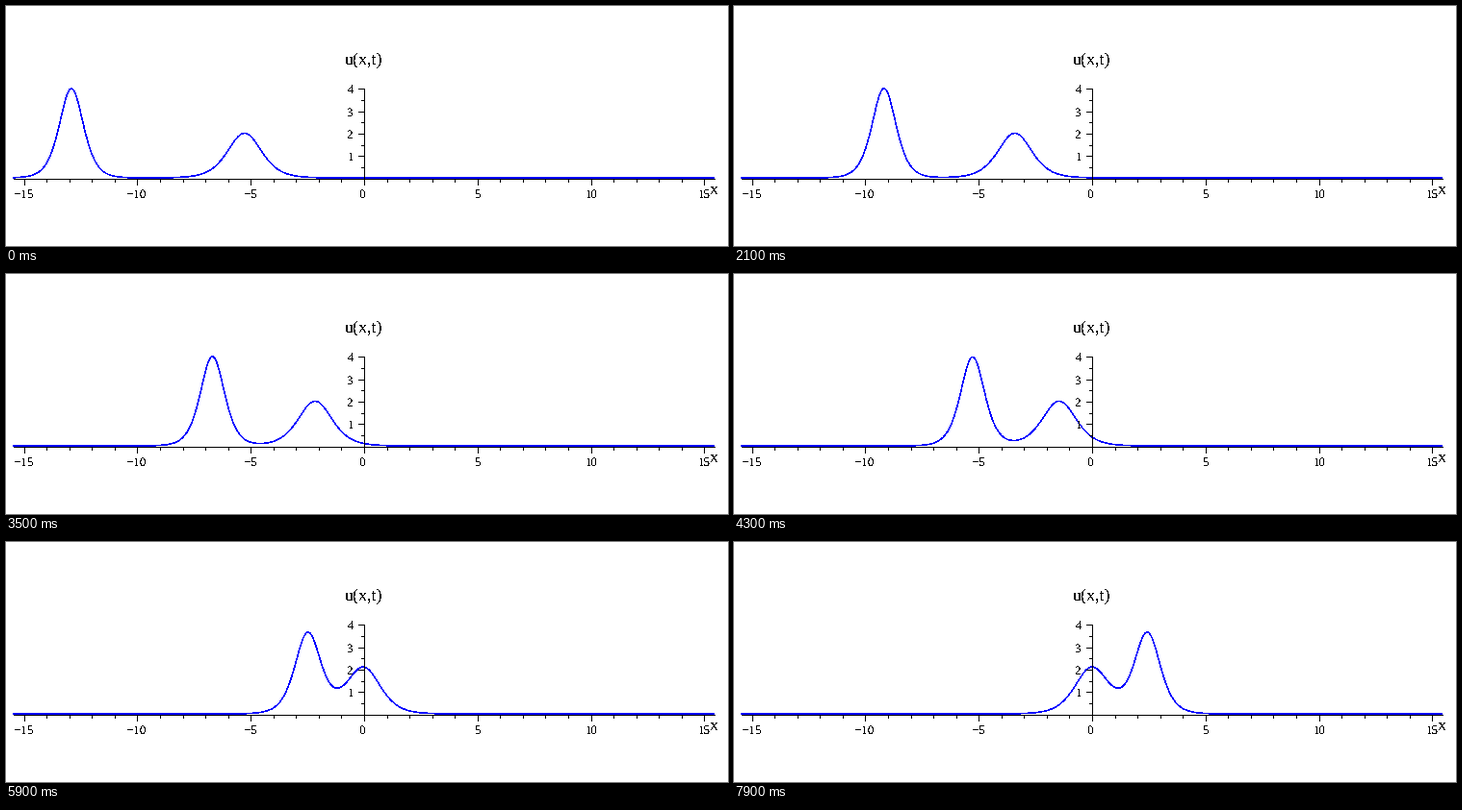
Recreate the animation shown at these times as a matplotlib script. Size 750 by 250 pixels, loop 8000 ms.

```python
"""Two-soliton solution of the KdV equation, u_t + 6 u u_x + u_xxx = 0."""
import numpy as np
import matplotlib.pyplot as plt
from matplotlib.animation import FuncAnimation

W, H, DPI = 750, 250, 100
FRAMES, INTERVAL = 80, 100
X0, Y0 = 372, 180            # pixel of the axes' crossing
SX, SY = 23.551, 23.5        # pixels per unit
LEFT, RIGHT = 8, 736
BASE, RISE = 179, 23.25      # curve's zero line and pixels per unit
HALF = 0.85                  # half of the curve's pen width
DT = 4 / 180
T0 = -69 * DT
K1, K2 = np.sqrt(8), 2.0

plt.rcParams.update({
    "font.family": "Liberation Serif",
    "text.antialiased": False,
    "text.hinting": "none",
    "text.hinting_factor": 1,
})


def px(n):
    return n * 72 / DPI


def soliton(x, t):
    """u = 2 (ln F)'' for F = b cosh A + a cosh B."""
    th1, th2 = K1 * (x - K1**2 * t), K2 * (x - K2**2 * t)
    a, b = (K1 + K2) / 2, (K1 - K2) / 2
    A, B = (th1 + th2) / 2, (th1 - th2) / 2
    F = b * np.cosh(A) + a * np.cosh(B)
    F1 = a * b * (np.sinh(A) + np.sinh(B))
    F2 = a * b * (a * np.cosh(A) + b * np.cosh(B))
    return 2 * (F2 / F - (F1 / F) ** 2)


fig = plt.figure(figsize=(W / DPI, H / DPI), dpi=DPI, facecolor="white")
ax = fig.add_axes([0, 0, 1, 1])


def rule(x1, y1, x2, y2):
    """One-pixel black bar covering both end pixels."""
    ax.add_patch(plt.Rectangle((x1, y1), x2 - x1 + 1, y2 - y1 + 1, fc="black",
                               lw=0, aa=False, snap=False, zorder=3))


def label(x, y, s, size=13, ha="center"):
    ax.text(x, y, s, size=px(size), ha=ha, va="baseline", zorder=3)


rule(LEFT, Y0, RIGHT, Y0)
rule(X0, Y0 - 94, X0, Y0)

for n in range(-15, 16):
    x = round(X0 + n * SX)
    major = n % 5 == 0
    rule(x, Y0, x, Y0 + (6 if major else 3))
    if major:
        label(x if n else x - 1, 200, str(n).replace("-", "\u2212"))

for n in range(1, 9):
    y = round(Y0 - n * SY / 2)
    major = n % 2 == 0
    rule(X0 - (6 if major else 3), y, X0, y)
    if major:
        label(361, y + 5, str(n // 2), ha="right")

label(371.5, 61, "u(x,t)", 18)
label(735, 196, "x", 18)

# The curve is plotted as hard-edged pixels lying within the pen's reach.
cols = np.arange(LEFT - 1, RIGHT) + 0.5
rows = np.arange(H)[:, None] + 0.5
canvas = np.zeros((H, W, 4))
canvas[..., 2] = 1
image = ax.imshow(canvas, extent=(0, W, H, 0), aspect="auto",
                  interpolation="nearest", zorder=2)
ax.set(xlim=(0, W), ylim=(H, 0))
ax.axis("off")


def update(i):
    y = BASE - RISE * soliton((cols + 0.5 - X0) / SX, T0 + i * DT)
    reach = HALF * np.hypot(1, np.gradient(y))
    canvas[:, LEFT - 1:RIGHT, 3] = np.abs(rows - y) < reach
    image.set_data(canvas)
    return image,


anim = FuncAnimation(fig, update, frames=FRAMES, interval=INTERVAL, repeat=True,
                     repeat_delay=0)
plt.show()
```
